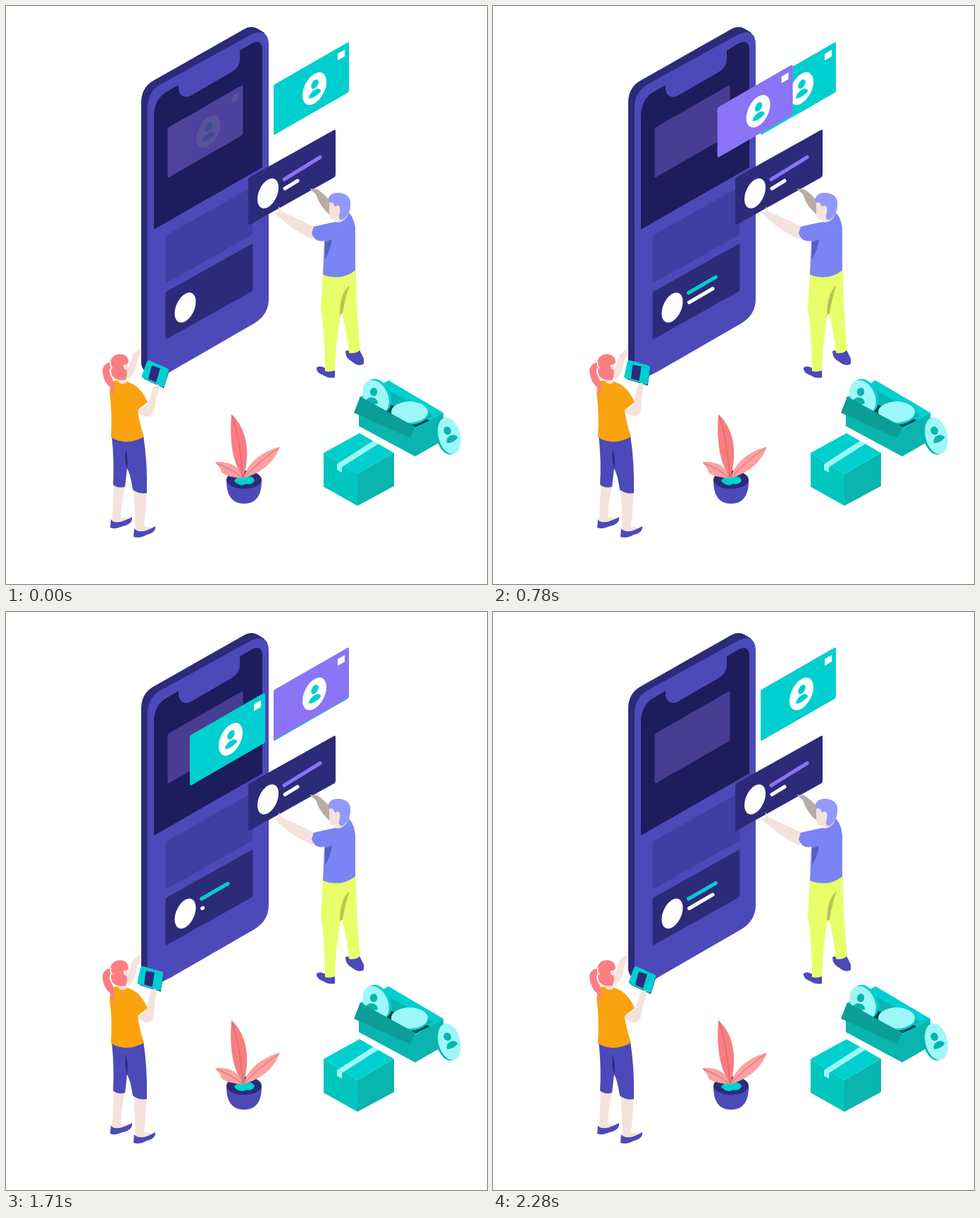
Recreate the animation shown at these times as an HTML page. Size 683 by 820 pixels, loop 2520 ms.

```html
<!DOCTYPE html>
<html lang="en">
<head>
<meta charset="utf-8">
<title>Arranging cards</title>
<style>
  html, body { margin: 0; width: 100%; height: 100%; overflow: hidden; background: #fff; }
  svg { display: block; width: 100vw; height: 100vh; }
  .navy { fill: #2c2b7a; }
  .blue { fill: #4b4ab8; }
  .teal { fill: #00cfd0; }
  .deep { fill: #0ab4af; }
  .mint { fill: #9df7f8; }
  .skin { fill: #f4e3dc; }
  .hair { fill: #fa7f83; }
  .line { fill: none; stroke-width: 5; stroke-linecap: round; }
</style>
</head>
<body>
<svg viewBox="0 0 683 820">
  <defs>
    <g id="person">
      <ellipse cx="58.5" cy="32.5" rx="5.2" ry="6"/>
      <path d="M50 48C50 38 67 38 67 48Q58 52 50 48Z"/>
    </g>
    <g id="card">
      <rect width="107" height="71.5" rx="2.5" fill="currentColor"/>
      <ellipse cx="58" cy="38.5" rx="17" ry="21" fill="#fff"/>
      <rect x="91" y="8" width="10" height="9.5" fill="#fff"/>
      <use href="#person" class="teal"/>
    </g>
    <g id="panel">
      <rect width="124" height="67.5" rx="2.5" class="navy"/>
      <ellipse cx="28" cy="37.5" rx="15" ry="19.6" fill="#fff"/>
    </g>
  </defs>

  <g id="phone">
    <path class="navy" d="M192 137Q192 116 209 106L337 33.5Q347 27 357 32L367 38L212 524Q192 520 192 506Z"/>
    <path class="blue" d="M201 142Q202 122 218 112L349 40Q373 30 373 56V416Q373 438 352 450.5L234 518.5L219 526Q201 526 201 506Z"/>
    <path fill="#1d1c5c" d="M210 317V155Q211 133 226 123L245 112V118Q247 132 261 128L320 94Q332 87 332 75V63L349 53Q364 46 364 63V229Z"/>
    <rect width="107" height="71" rx="2.5" fill="#483d92" transform="matrix(1 -.575 0 1 229.5 173)"/>
    <rect width="124" height="68" rx="2.5" fill="#3f3ea2" transform="matrix(1 -.565 0 1 226.5 326)"/>
    <use href="#panel" transform="matrix(1 -.56 0 1 226.5 406)"/>
    <line id="title" class="line" stroke="#00cfd0"/>
    <line id="detail" class="line" stroke="#fff"/>
  </g>

  <g id="man">
    <use href="#panel" transform="matrix(1 -.56 0 1 344 244)"/>
    <path class="line" stroke="#8b74f5" d="M395 246L446 214.5"/>
    <path class="line" stroke="#fff" stroke-width="6" d="M396 259L414 248"/>
    <path fill="#b9aba5" d="M431 259L442 260Q454 268 463 280L461 297Q446 286 440 267Z"/>
    <path class="skin" d="M387 284L391 291Q413 301 440 314L435 331Q407 318 391 302L380 293L387 292Z"/>
    <path class="blue" d="M441 513Q446 509 454 514L467 515V527Q458 529 451 524Q440 520 441 513ZM482 490Q485 487 490 491L502 488L508 500V508Q500 512 492 505Q482 500 482 490Z"/>
    <path fill="#e8ff6a" d="M450 378L497 374Q497 430 503 488Q496 494 487 492Q484 460 476 433Q468 475 467 517Q460 520 453 518Q453 470 447 430Z"/>
    <path fill="#b7c552" d="M488 396Q474 407 474 439L478 436Q482 411 488 396Z"/>
    <path fill="#7a84f5" d="M437 313Q454 309 469 306Q481 308 487 293Q497 304 496 324V375Q476 391 450 381L452 333Q438 336 434 322Z"/>
    <path fill="#5a5cc0" d="M453 335L463 331Q461 346 453 359Z"/>
    <path class="skin" d="M459 279H476L484 297Q479 308 469 307L467 303Q459 304 459 294Z"/>
    <path fill="#9299f8" d="M457 276Q459 264 473 265Q490 267 489 281Q490 294 479 303Q472 305 473 297Q477 283 470 283Q467 287 465 280Z"/>
  </g>

  <g id="woman">
    <path class="skin" d="M190 486Q191 498 186 503Q185 520 174 530L169 525Q176 508 180 494Z"/>
    <path class="skin" d="M153 680H169Q164 705 163 725L177 728L150 739Q152 708 153 680ZM181 681H200Q199 713 196 738L210 741L184 750Q183 713 181 681Z"/>
    <path class="blue" d="M149 728Q154 738 179 725Q180 735 166 738Q154 743 148 740ZM182 741Q190 751 212 738Q213 747 200 750Q190 756 181 753Z"/>
    <path class="blue" d="M150 609H195Q201 647 200 691Q188 693 180 686Q177 665 172 656L169 682Q159 685 152 679Q154 645 150 609Z"/>
    <path class="navy" d="M172 657Q168 643 170 628Q174 640 172 657Z"/>
    <g id="forearm">
      <path class="skin" d="M186 572Q197 572 203 560L209 541Q213 536 218 539Q217 549 213 556Q212 573 207 580Q198 587 187 575Z"/>
      <path class="navy" d="M204 505L232 517L224 542L196 529Z"/>
      <path class="teal" d="M204 503Q201 502 200 505L193 524Q192 527 195 528L221 540Q224 541 225 538L231 518Q232 515 229 514Z"/>
      <path class="navy" d="M207 510L219 514L213 534L202 529Z"/>
      <path class="skin" d="M209 543Q211 536 217 537Q219 541 216 546Z"/>
    </g>
    <path fill="#faa30f" d="M150 533Q163 528 177 535Q192 541 201 562L187 573Q189 591 196 611Q172 625 149 612Q151 575 147 548Z"/>
    <path class="skin" d="M156 508H172Q176 520 171 529Q174 536 164 536Q154 533 156 508Z"/>
    <path class="hair" d="M149 502Q153 493 163 494Q174 495 174 506Q172 509 167 509Q166 515 171 516Q173 521 170 530Q158 533 151 525Q147 517 151 512Q146 509 149 502Z"/>
    <path class="hair" d="M150 505Q137 507 137 518Q138 533 148 541L151 554Q157 537 149 525Q144 515 151 512Z"/>
    <path d="M149 505Q147 510 151 514" fill="none" stroke="#fff" stroke-width="1.5"/>
  </g>

  <g id="plant">
    <path class="blue" d="M313 671Q312 706 338 706Q364 706 363 671Z"/>
    <ellipse class="navy" cx="338" cy="672" rx="25" ry="13"/>
    <path class="teal" d="M324 674Q326 667 338 668Q351 665 353 673Q350 680 341 678Q333 683 324 674Z"/>
    <path fill="#fca0a0" d="M337 670C345 645 365 632 389 625C380 650 360 663 337 670ZM336 670C324 669 303 666 305 657L297 647C318 645 333 654 336 670Z"/>
    <path fill="#f97d80" d="M337 669C319 645 318 610 320 579C345 602 346 640 337 669Z"/>
    <path fill="none" stroke="#d0656b" d="M321 581Q333 615 336 668M387 627Q360 645 338 669M299 649Q320 656 335 669"/>
  </g>

  <g id="boxes">
    <path class="teal" d="M543 531L621 577L582 602L501 556Z"/>
    <path class="deep" d="M536 541L606 581L581 597L510 557Z"/>
    <path fill="#06484a" d="M508 557L540 563L602 588L581 598Z"/>
    <path class="deep" d="M501 578L582 600L621 577V616L581 639L501 596Z"/>
    <g transform="rotate(-25 526 554)">
      <ellipse class="teal" cx="529" cy="554" rx="17" ry="25"/>
      <ellipse class="mint" cx="525" cy="554" rx="17" ry="25"/>
    </g>
    <use href="#person" class="deep" transform="rotate(10 522 548) translate(463.5 515)"/>
    <ellipse class="teal" cx="573" cy="579" rx="26" ry="15"/>
    <ellipse class="mint" cx="573" cy="576" rx="26" ry="15"/>
    <path fill="#0a9e97" d="M503 554L581 597L574 613L494 577Z"/>
    <g transform="rotate(-14 628 610)">
      <ellipse class="deep" cx="626.5" cy="610" rx="15.5" ry="26.5"/>
      <ellipse class="mint" cx="629.5" cy="610" rx="15.5" ry="26.5"/>
    </g>
    <use href="#person" class="deep" transform="rotate(-28 627 603) translate(568.5 570)"/>
    <path class="teal" d="M451 634L502 606L551 634L499 664Z"/>
    <path fill="#00c6bd" d="M451 634L499 664V709L451 682Z"/>
    <path class="deep" d="M499 664L551 634V681L499 709Z"/>
    <path class="mint" d="M470 650L521 617L529 621L477 654V662L470 658Z"/>
  </g>

  <use href="#card" color="#00cfd0" transform="matrix(1 -.575 0 1 380 112)"/>
  <use href="#card" id="violetCard" color="#8b74f5"/>
  <use href="#card" id="tealCard" color="#00cfd0"/>
</svg>
<script>
const LOOP = 2520, CYCLE = 1140, REDRAW = 1290;
const el = id => document.getElementById(id);
const progress = (t, start, length) => Math.min(1, Math.max(0, (t - start) / length));
const ease = u => u * u * (3 - 2 * u);
const eased = (t, start, length) => ease(progress(t, start, length));

// Each card fades in, lifts off the screen, then slides along the isometric axis.
function moveCard(id, t) {
  const lift = eased(t, 0, 300), slide = eased(t, 394, 712);
  const x = 229.5 + 10 * lift + 140.5 * slide;
  const y = 173 + 14 * lift - 76 * slide;
  el(id).setAttribute("transform", `matrix(1 -.575 0 1 ${x} ${y})`);
  el(id).setAttribute("opacity", progress(t, -20, 200));
}

function growLine(id, x, y, dx, dy, amount) {
  const ends = { x1: x, y1: y, x2: x + dx * amount, y2: y + dy * amount };
  for (const key in ends) el(id).setAttribute(key, ends[key]);
  el(id).setAttribute("visibility", amount > 0 ? "visible" : "hidden");
}

function render(t) {
  moveCard("violetCard", t);
  moveCard("tealCard", t - CYCLE);

  const start = t < REDRAW ? 150 : 1420;
  growLine("title", 277.5, 407, 39, -22.5, progress(t, start, 300));
  growLine("detail", 278.5, 420.5, 33.5, -19.5, progress(t, start + 280, 300));

  const turn = -8 * (eased(t, 150, 630) - eased(t, 1650, 630));
  el("forearm").setAttribute("transform", `rotate(${turn} 196 572)`);
}

const began = performance.now();
function tick() {
  const t = (performance.now() - began) % LOOP;
  render(Math.floor(t / 30) * 30);
  requestAnimationFrame(tick);
}
tick();
</script>
</body>
</html>
```
